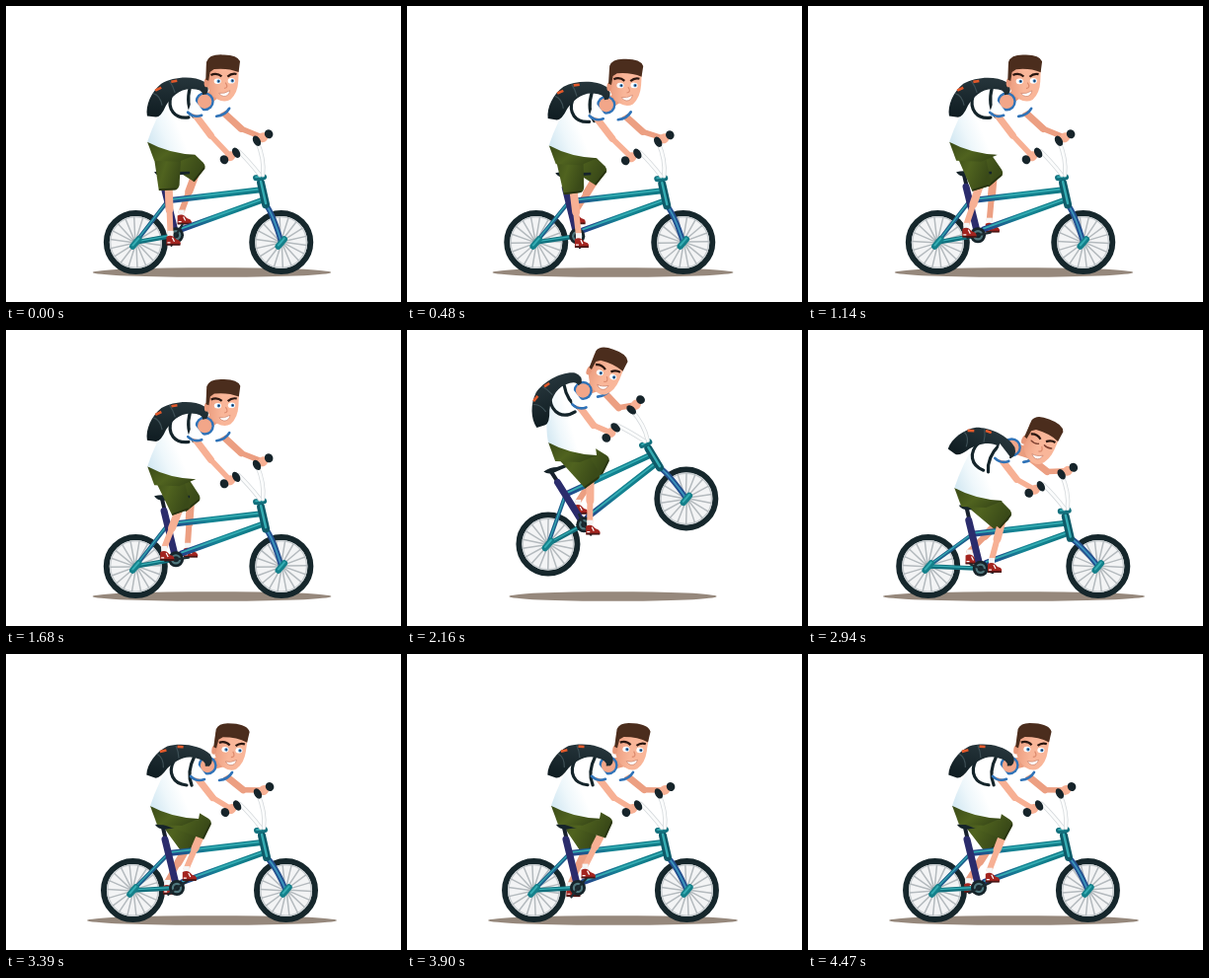
An HTML page for the animation above (4.5 s loop, 400 by 300 pixels).

```html
<!DOCTYPE html>
<html lang="en">
<head>
<meta charset="utf-8">
<title>Bike hop</title>
<style>
html, body { margin: 0; width: 100%; height: 100%; overflow: hidden; background: #fff; }
svg { display: block; width: 100vw; height: 100vh; }
</style>
</head>
<body>
<svg viewBox="0 0 400 300">
  <defs>
    <linearGradient id="cloth" x1="0" y1=".7" x2=".75" y2=".45">
      <stop offset="0" stop-color="#d5e9f3"/>
      <stop offset=".25" stop-color="#eef7fb"/>
      <stop offset=".5" stop-color="#fff"/>
    </linearGradient>
    <linearGradient id="olive" x1="0" y1="0" x2="1" y2=".5">
      <stop offset="0" stop-color="#3a4a18"/>
      <stop offset=".55" stop-color="#50631f"/>
      <stop offset="1" stop-color="#3a4a18"/>
    </linearGradient>
    <linearGradient id="paint">
      <stop offset="0" stop-color="#23408a"/>
      <stop offset=".45" stop-color="#148594"/>
      <stop offset="1" stop-color="#0f7783"/>
    </linearGradient>
    <linearGradient id="bag" x1="0" y1="0" x2="0" y2="1">
      <stop offset="0" stop-color="#26353b"/>
      <stop offset="1" stop-color="#0f1c21"/>
    </linearGradient>
    <linearGradient id="skin">
      <stop offset="0" stop-color="#ea9b7d"/>
      <stop offset=".5" stop-color="#f9b699"/>
    </linearGradient>
    <g id="wheel">
      <circle r="29.5" fill="#f3f4f5" stroke="#16272c" stroke-width="6"/>
      <circle r="25.8" fill="none" stroke="#c9ced1" stroke-width="1.6"/>
    </g>
    <path id="spokes" fill="none" stroke="#b4babe" stroke-width="1.5"/>
    <g id="shoe">
      <path d="M-5-10H1V-3H-5Z" fill="#f5f5f5"/>
      <path d="M-6-4Q-2-6 1-4Q3-1 7 0Q9 2 8 4H-6Z" fill="#a3241f"/>
      <path d="M-6 4H8" stroke="#4b1514" stroke-width="1.8"/>
      <path d="M0-3 2 1M-5 2H-2" stroke="#fff" stroke-width="1.2"/>
    </g>
    <g id="pack">
      <path d="M2-2C-2 12 6 22 20 20M21-10C18 2 20 12 25 19" fill="none" stroke="#14242a" stroke-width="3.2" stroke-linecap="round"/>
      <path d="M-22 19C-24 8-18-6-8-14C4-21 24-23 36-16Q42-10 38-4L34-3Q34-9 22-9C10-9 2 0-3 8Q-8 20-13 20Z" fill="url(#bag)"/>
      <path d="M-16-4Q-9-2-7 8M0-17Q4-12 6-5" fill="none" stroke="#3d4f55" stroke-width="1.2"/>
      <path d="M-14-7-8-10M2-16 8-17" stroke="#e2592b" stroke-width="2.6"/>
    </g>
    <g id="face">
      <path d="M-16-15-15 4Q-12 14-4 19Q4 23 10 19Q17 12 17 0V-15Z" fill="url(#skin)"/>
      <ellipse cx="-15" cy="3" rx="2.5" ry="4.5" fill="#e8987a"/>
      <path d="M-16 0V-18Q-14-26 0-26Q15-27 18-20L17-9Q6-13-8-11L-12-8-13 1Z" fill="#4b2d1d"/>
      <path d="M-11-5Q-5-8 0-4M6-4Q10-8 15-7" fill="none" stroke="#2a1711" stroke-width="2.2"/>
      <path d="M4 2Q8 7 3 8" fill="none" stroke="#dd8b6e" stroke-width="1.2"/>
      <path d="M-2 13Q3 14 9 10Q8 16 3 16Q0 16-2 13Z" fill="#fff" stroke="#c77a63" stroke-width=".6"/>
    </g>
  </defs>
  <g id="scene" stroke-linejoin="round"></g>
</svg>
<script>
const LOOP = 4500, STROKE = 533;
const JUMP = 1902, LANDED = 2854;          // pedalling slows between these
const LIFT = 1960, TOUCH = 2760, DIP = 360;
const SKIN = '#f7b094', SHADE = '#ec9f82', BLUE = '#2f73b8', DARK = '#16242a';

const clamp = u => Math.max(0, Math.min(1, u));
const add = (p, x, y) => [p[0] + x, p[1] + y];
const mix = (a, b, u) => [a[0] + (b[0] - a[0]) * u, a[1] + (b[1] - a[1]) * u];
const dist = (a, b) => Math.hypot(b[0] - a[0], b[1] - a[1]);
const rad = deg => deg * Math.PI / 180;
const spin = ([x, y], a) => [x * Math.cos(a) - y * Math.sin(a), x * Math.sin(a) + y * Math.cos(a)];
const pt = p => p[0].toFixed(2) + ' ' + p[1].toFixed(2);

const stroke = (d, color, w) =>
  `<path d="${d}" fill="none" stroke="${color}" stroke-width="${w}" stroke-linecap="round"/>`;
const line = (pts, color, w) => stroke('M' + pts.map(pt).join('L'), color, w);
const curve = (a, c, b, color, w) => stroke(`M${pt(a)}Q${pt(c)} ${pt(b)}`, color, w);
const shape = (d, fill) => `<path d="${d}" fill="${fill}"/>`;
const disc = (p, rx, ry, fill, deg = 0) =>
  `<ellipse rx="${rx}" ry="${ry}" fill="${fill}" transform="translate(${pt(p)}) rotate(${deg})"/>`;
const use = (id, p, deg = 0) => `<use href="#${id}" transform="translate(${pt(p)}) rotate(${deg})"/>`;
const tube = (a, b, w, dark = '#12707d') =>
  line([a, b], dark, w) + line([add(a, 0, -w * .15), add(b, 0, -w * .15)], '#35adb3', w * .3);

// Pedal turns since the start; the rider bobs once per turn.
function turns(t) {
  if (t < JUMP) return (t - 37) / STROKE;
  if (t < LANDED) return 3.5 + (t - JUMP) / (LANDED - JUMP);
  return 4.5 + (t - LANDED) / STROKE;
}

function poseAt(t) {
  const u = clamp((t - LIFT) / (TOUCH - LIFT));
  const arc = skew => Math.max(0, Math.sin(Math.PI * u ** skew));   // low skew rises early
  const air = arc(.6), fly = arc(1) ** .25;
  const turn = turns(t);
  const bob = (1 - Math.cos(2 * Math.PI * turn)) / 2 * (1 - fly);
  const dip = Math.sin(Math.PI * clamp((t - TOUCH) / DIP));

  // Bike: the wheels lift one after the other, the frame follows.
  const front = 70 * air, rear = 40 * arc(1.2);
  const base = 147 + 8 * bob + 19 * dip;
  const pitch = -Math.asin((front - rear) / base);
  const mid = [205 + bob + 2 * dip + 8 * air, 239.5 - (front + rear) / 2];
  const onBike = (x, y) => add(spin([x - 205, y - 239.5 + 5 * bob + 6 * dip], pitch), ...mid);
  const hub = onBike(172, 232);
  const crank = spin([0, -12], rad(232 + 360 * turn));
  const pedal = add(hub, 2, -5);

  // Rider: the torso leans about the hip, the head about the collar.
  const lean = rad(-25 * air);
  const hip = [163 + 3 * bob + 3 * dip, 143 + 17 * bob + 10 * dip - 30 * arc(.9)];
  const onTorso = (x, y) => add(spin([x, y], lean), ...hip);
  const collar = onTorso(38, -47);
  const neck = rad(-53 + 15 * bob + 32 * dip + 12 * air);

  return {
    t, hip, collar, onBike, onTorso, hub, dip,
    rear: add(spin([-base / 2, 0], pitch), ...mid),
    front: add(spin([base / 2, 0], pitch), ...mid),
    near: add(pedal, ...crank),
    far: add(pedal, -crank[0], -crank[1]),
    head: add(collar, 28 * Math.cos(neck), 27 * Math.sin(neck)),
    headTilt: 2 + 6 * bob + 17 * dip + 20 * air,
    packTilt: lean * 180 / Math.PI + 13 * bob + 20 * dip,
    shadow: 120.5 + 6 * bob + 7.5 * dip - 17 * fly
  };
}

const wheel = (p, t) => use('wheel', p) + use('spokes', p, t * .4) + disc(p, 4, 4, '#8fa3a8');
const peg = p => tube(add(p, -3, 4), add(p, 3, -3), 6.5, '#14808a');

function leg(hip, foot, skin) {
  const thigh = 38, shin = 44, ankle = add(foot, -2, -8);
  const d = dist(hip, ankle), reach = Math.min(d, thigh + shin);
  const along = (thigh ** 2 - shin ** 2 + reach ** 2) / (2 * reach);
  const side = Math.sqrt(Math.max(0, thigh ** 2 - along ** 2));
  const knee = add(spin([along, -side], Math.atan2(ankle[1] - hip[1], ankle[0] - hip[0])), ...hip);
  const dir = Math.atan2(knee[1] - hip[1], knee[0] - hip[0]);
  const at = (x, y) => add(spin([x, y], dir), ...hip);
  return line([knee, mix(knee, ankle, .5)], skin, 8) + line([mix(knee, ankle, .4), ankle], skin, 6)
    + use('shoe', foot)
    + shape(`M${pt(at(-4, -15))}L${pt(at(thigh, -11))}Q${pt(at(43, -10))} ${pt(at(43, -6))}L${pt(at(43, 10))}L${pt(at(-4, 15))}Z`, 'url(#olive)')
    + line([at(42, -7), at(42, 9)], '#2a3512', 1.8);
}

function frame(p) {
  const at = p.onBike, top = at(157, 169), joint = at(164, 197), crown = at(263, 201);
  const elbow = add(mix(crown, p.front, .3), 3, -1);
  return tube(p.rear, joint, 4, '#1d5f8c') + tube(p.rear, p.hub, 4.5)
    + tube(joint, at(258, 186), 6, 'url(#paint)') + tube(at(178, 226), at(261, 196), 6, 'url(#paint)')
    + line([add(top, 1, 2), joint], '#17202c', 4)
    + line([at(160, 183), p.hub], '#2b2c6c', 7)
    + shape(`M${pt(at(150, 168))}Q${pt(at(158, 166))} ${pt(at(164, 168))}L${pt(at(186, 167.5))}L${pt(at(186, 170))}L${pt(at(164, 172))}Q${pt(at(154, 174))} ${pt(at(150, 168))}Z`, DARK)
    + curve(crown, elbow, p.front, '#24508f', 5.5) + curve(crown, elbow, p.front, '#3a94bd', 1.8)
    + tube(at(258, 179), crown, 8, '#0e5b69') + tube(at(253, 174), at(261, 173), 6)
    + peg(p.rear) + peg(p.front);
}

function crankset(p) {
  const arm = f => line([p.hub, add(f, -1, 5)], '#1c2b31', 2.2);
  return disc(p.hub, 8, 8, DARK) + disc(p.hub, 5.2, 5.2, '#50777d') + disc(p.hub, 3, 3, DARK) + arm(p.far) + arm(p.near);
}

function torso(p, sleeve) {
  const c = p.collar, hemB = add(p.hip, -20, -6), hemF = add(p.hip, 29, 7);
  const pelvis = [hemB, hemF, add(p.hip, 12, 14), add(p.hip, -13, 13)];
  return shape('M' + pelvis.map(pt).join('L') + 'Z', 'url(#olive)')
    + shape(`M${pt(p.onTorso(5, -59))}Q${pt(add(c, -8, -16))} ${pt(add(c, 4, -9))}L${pt(add(sleeve, 6, -4))}L${pt(add(sleeve, -6, 3))}`
      + `L${pt(p.onTorso(34, -18))}L${pt(hemF)}Q${pt(add(p.hip, 2, 6))} ${pt(hemB)}Q${pt(p.onTorso(-13, -28))} ${pt(p.onTorso(5, -59))}Z`, 'url(#cloth)')
    + curve(add(sleeve, -7, 4), add(sleeve, 2, 3), add(sleeve, 6, -4), BLUE, 2.6);
}

function head(p) {
  const open = 1 - p.dip;
  const eye = (x, y) => open > .3
    ? `<g transform="translate(${x} ${y}) scale(1 ${open.toFixed(2)})"><ellipse rx="3.6" ry="2.8" fill="#fff"/><circle cx="1" r="1.7" fill="#3b83c4"/><circle cx="1.2" r=".8" fill="#142030"/></g>`
    : stroke(`M${x - 4} ${y}Q${x} ${y + 2} ${x + 4} ${y}`, '#7a3d2d', 1.4);
  return `<g transform="translate(${pt(p.head)}) rotate(${p.headTilt.toFixed(2)})"><use href="#face"/>${eye(-4, 1)}${eye(10, 0)}</g>`;
}

function draw(t) {
  const p = poseAt(t), gripN = p.onBike(227, 152), gripF = p.onBike(260, 133);
  const sleeveN = p.onTorso(28, -34), sleeveF = p.onTorso(57, -36);
  const dir = Math.atan2(gripF[1] - gripN[1], gripF[0] - gripN[0]), tilt = dir * 180 / Math.PI;
  const bar = (q, s) => add(q, s * Math.cos(dir), s * Math.sin(dir));
  const rod = (a, c, b) => curve(a, c, b, '#d6dadd', 4.4) + curve(a, c, b, '#fbfcfc', 2.8);
  const arm = (a, b, skin) => {
    const elbow = add(mix(a, b, .45), 0, Math.max(0, 62 - dist(a, b)) * .35);
    return line([a, elbow], skin, 7) + line([elbow, b], skin, 5.5);
  };
  const grip = (q, out) => line([bar(q, -7), bar(q, 7)], '#1b262b', 4) + disc(q, 5.5, 4.8, SKIN, tilt)
    + disc(bar(q, -7 * out), 3.6, 5.6, DARK, tilt) + disc(bar(q, 7 * out), 4.2, 4.6, DARK, tilt);
  const patch = [add(p.collar, -12, -4), add(p.collar, -2, 9), add(sleeveN, 7, 2), add(sleeveN, -7, -2)];

  return disc([208.5, 270], p.shadow, 4.8, '#96887c')
    + wheel(p.rear, t) + wheel(p.front, t)
    + leg(p.hip, p.far, SHADE)
    + frame(p) + crankset(p)
    + rod(bar(gripF, -7), p.onBike(262, 155), p.onBike(260, 171))
    + rod(bar(gripN, 10), p.onBike(246, 157), p.onBike(257, 171))
    + arm(sleeveF, gripF, SHADE) + grip(gripF, 1)
    + leg(p.hip, p.near, SKIN)
    + torso(p, sleeveF)
    + line([p.collar, add(p.head, -5, 12)], '#ea9d7f', 11)
    + disc(p.collar, 9.6, 9.6, BLUE) + disc(p.collar, 7.2, 7.2, '#f2a689')
    + use('pack', p.onTorso(2, -51), p.packTilt)
    + head(p)
    + arm(sleeveN, gripN, SKIN)
    + shape('M' + patch.map(pt).join('L') + 'Z', '#fcfeff')
    + curve(add(sleeveN, -7, -2), add(sleeveN, -1, 4), add(sleeveN, 7, 1), BLUE, 2.6)
    + grip(gripN, -1);
}

let rays = '';
for (let a = 0; a < 360; a += 20) rays += `M${pt(spin([4, 0], rad(a)))}L${pt(spin([26, 0], rad(a + 6)))}`;
document.getElementById('spokes').setAttribute('d', rays);

const scene = document.getElementById('scene');
const start = performance.now();
function tick() {
  scene.innerHTML = draw((performance.now() - start) % LOOP);
  requestAnimationFrame(tick);
}
tick();
</script>
</body>
</html>
```
